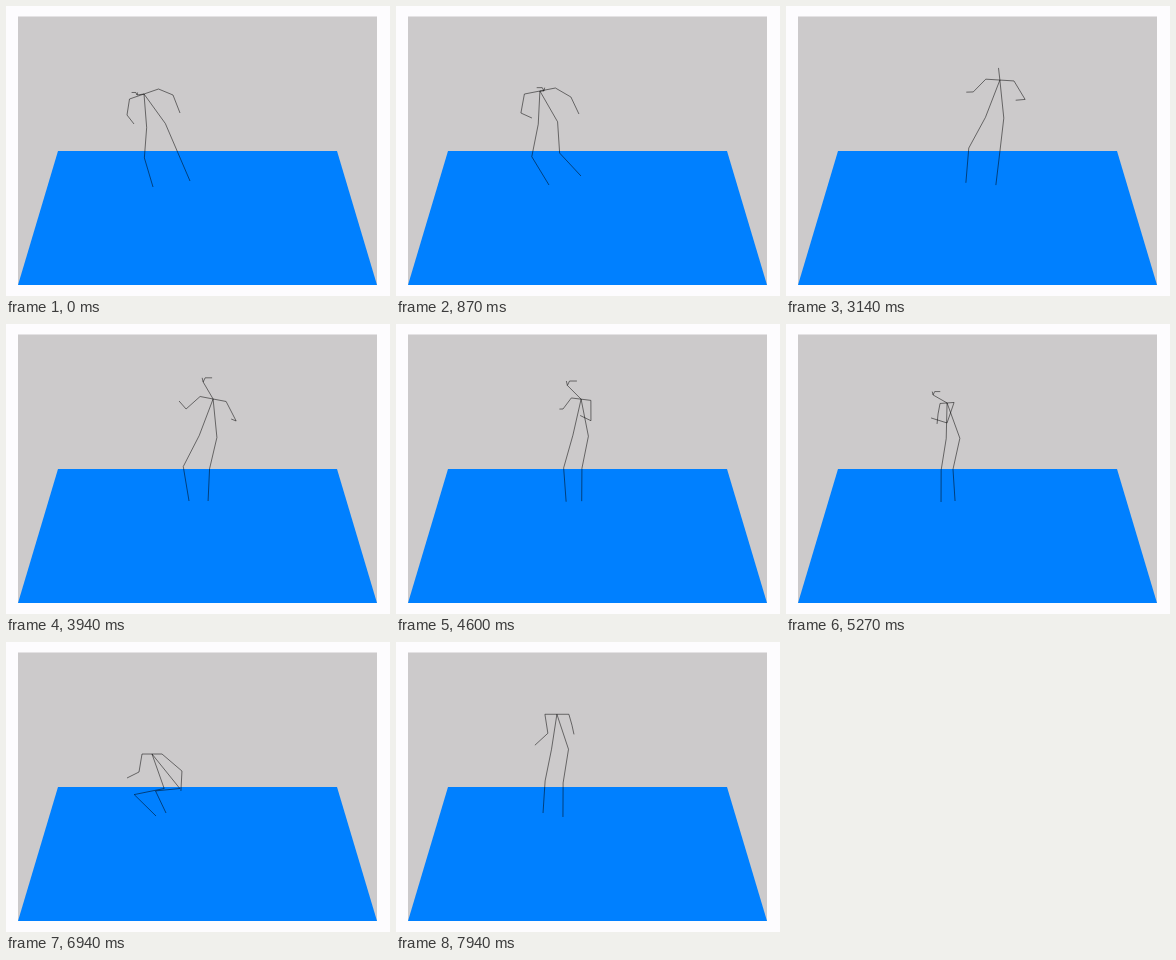
An HTML page for the animation above (8000 ms loop, 384 by 290 pixels).

```html
<!DOCTYPE html>
<html lang="en">
<head>
<meta charset="utf-8">
<title>Walking stick figure</title>
<style>
  html, body { margin: 0; width: 100%; height: 100%; overflow: hidden; background: #fdfcfe; }
  svg { display: block; width: 384px; height: 290px; }
  #body { fill: none; stroke: #000; stroke-width: .6; stroke-opacity: .85; }
</style>
</head>
<body>
<svg viewBox="0 0 384 290">
  <path fill="#cccacb" d="M12 10.6H371V279H12Z"/>
  <path fill="#0080ff" d="M52 145H331L371 279H12Z"/>
  <path id="body"/>
</svg>
<script>
const LOOP = 8000, STEP = 200 / 3;
const poses = [];

// neck and feet are in stage space, everything else is relative to the neck.
// shoulder: neck to right shoulder, mirrored for the left one
// lean: neck to mid hip;  legs: foot x, y, knee bend
// arms: elbow x, y, hand x, y;  head: x, y, facing (-1 left view to 1)
const pose = (time, parts) => poses.push({ time, ...parts });

pose(0, {
  neck: [138, 88], shoulder: [14.5, -5], lean: [12, 31.5], head: [-7, 1, -.6],
  legL: [147, 181, 5.5], legR: [184, 175, 0],
  armL: [-17, 21, -10, 30], armR: [29, 1, 36, 19]
});
pose(870, {
  neck: [144, 85], shoulder: [15.5, -3], lean: [8, 32], head: [4, 0, -.8],
  legL: [153, 179, 12], legR: [185, 170, 10.5],
  armL: [-19, 22, -8, 27], armR: [31, 6, 39, 23]
});
pose(2270, {
  neck: [206, 75], shoulder: [14.5, -1.5], lean: [-2.5, 37], head: [7, -4, -1],
  legL: [170, 177, 3], legR: [210, 180, -1.5],
  armL: [-23, 15, -27, 26], armR: [25, 15, 12, 20]
});
pose(3940, {
  neck: [207, 75], shoulder: [13, 2.5], lean: [-5, 37.5], head: [-10, -17, 1],
  legL: [183, 177, 11], legR: [202, 177, 3],
  armL: [-27, 10, -34, 2], armR: [23, 22, 18, 20]
});
pose(5270, {
  neck: [161, 79], shoulder: [7, -.5], lean: [6, 35.5], head: [-14, -8, .8],
  legL: [155, 178, 2.5], legR: [169, 177, 4.5],
  armL: [-9, 11, -10, 21], armR: [0, 20, -16, 15]
});
pose(6940, {
  neck: [146, 112], shoulder: [10, 0], lean: [20, 34.5], head: [0, 0, 0],
  legL: [150, 174, 27], legR: [160, 171, 20],
  armL: [-13, 18, -25, 24], armR: [30, 17, 29, 37]
});
pose(7940, {
  neck: [161, 72], shoulder: [12, 0], lean: [3, 35], head: [0, 0, 0],
  legL: [147, 171, 2], legR: [167, 175, 2.5],
  armL: [-9, 19, -22, 31], armR: [15, 11, 17, 20]
});

// Smooth curve through one part of all poses.
function sample(part, t) {
  const last = poses.length - 1;
  t = Math.min(t, poses[last].time);
  let i = 0;
  while (i < last - 1 && t >= poses[i + 1].time) i++;
  const a = poses[i], b = poses[i + 1];
  const p = poses[Math.max(i - 1, 0)], n = poses[Math.min(i + 2, last)];
  const span = b.time - a.time, u = (t - a.time) / span, v = 1 - u;
  return a[part].map((from, k) => {
    const to = b[part][k];
    const out = (to - p[part][k]) / (b.time - p.time) * span;
    const into = (n[part][k] - from) / (n.time - a.time) * span;
    return v * v * (1 + 2 * u) * from + u * u * (3 - 2 * u) * to
      + u * v * v * out - u * u * v * into;
  });
}

// Knee: beside the middle of the line from hip to foot.
function leg(hip, [x, y, bend]) {
  const dx = x - hip[0], dy = y - hip[1], k = bend / Math.hypot(dx, dy);
  return [...hip, hip[0] + dx / 2 - dy * k, hip[1] + dy / 2 + dx * k, x, y];
}

const line = (...xy) => "M" + xy.map(n => n.toFixed(2)).join(" ");

function figure(t) {
  const get = part => sample(part, t);
  const neck = get("neck"), [sx, sy] = get("shoulder"), [lx, ly] = get("lean");
  const from = xy => xy.map((n, k) => n + neck[k % 2]);
  // The hips turn with the shoulders, but less.
  const hx = 4.5 + sx / 3, hy = sy * .4;
  const [x, y, face] = get("head"), rise = 4.2 * Math.abs(face);
  return [
    line(...neck, ...leg(from([lx - hx, ly - hy]), get("legL"))),
    line(...neck, ...leg(from([lx + hx, ly + hy]), get("legR"))),
    line(...neck, ...from([-sx, -sy, ...get("armL")])),
    line(...neck, ...from([sx, sy, ...get("armR")])),
    line(...neck, ...from([x, y, x + 2 * face, y - rise, x + 9 * face, y - rise])),
    line(...from([x, y, x - face, y - rise]))
  ].join("");
}

const body = document.getElementById("body");
const start = performance.now();

function draw() {
  const t = (performance.now() - start) % LOOP;
  body.setAttribute("d", figure(Math.floor(t / STEP + .05) * STEP));
  requestAnimationFrame(draw);
}
draw();
</script>
</body>
</html>
```
